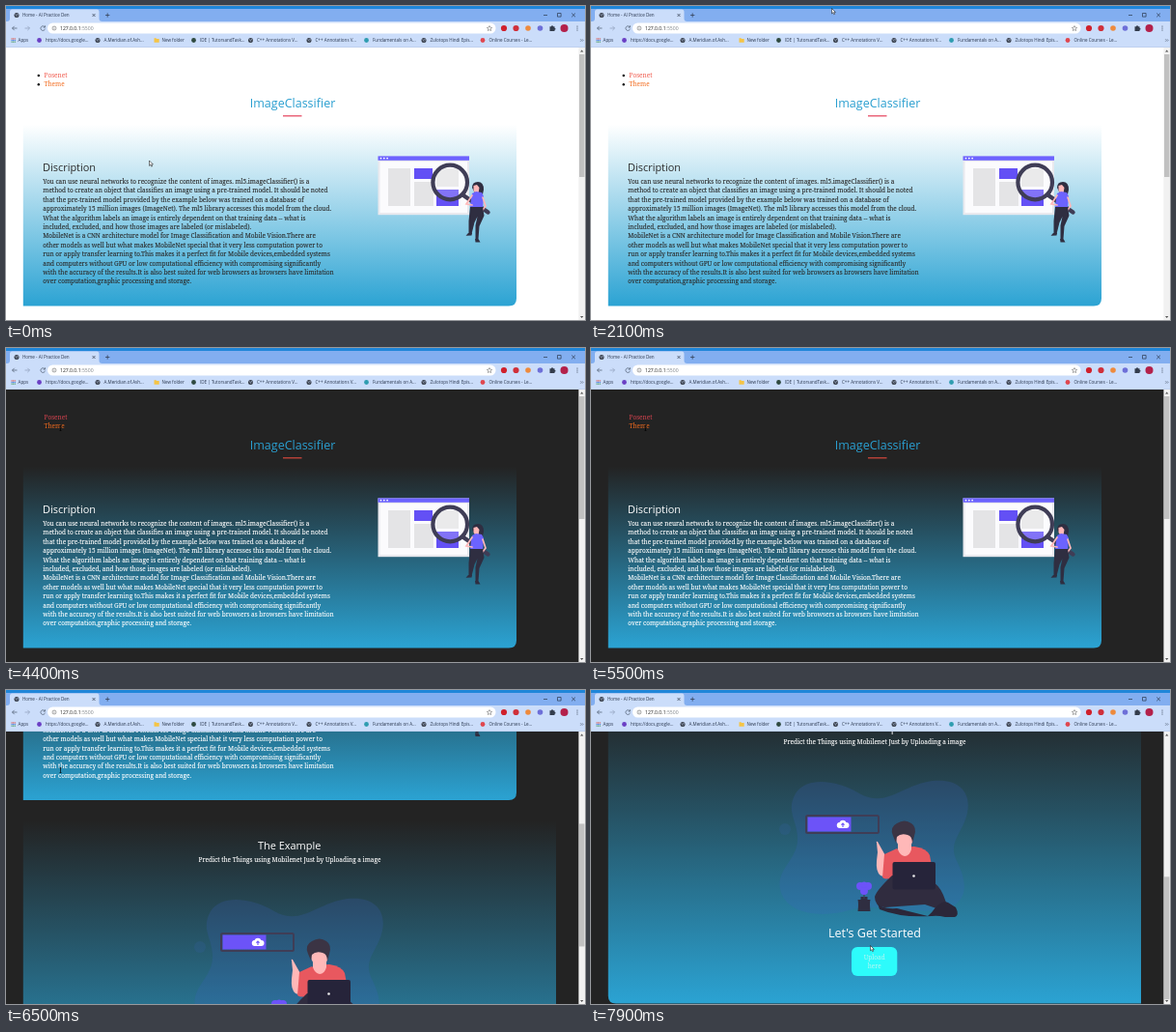
An HTML page that plays this animation: 600 by 325 pixels, repeating every 8000 ms.

```html
<!DOCTYPE html>
<html lang="en">
<head>
<meta charset="utf-8">
<title>Image classifier page</title>
<style>
  html, body { margin: 0; width: 100%; height: 100%; overflow: hidden; }
  svg { display: block; width: 100vw; height: 100vh;
    --bg: #fff; --ink: #2b2b2b; --rule: #e5405a; --link: #f0594c; }
  svg.dark { --bg: #232323; --ink: #fff; --rule: #d8483c; --link: #d4434f; }
  svg.dark .bullet { display: none; }
  .bg { fill: var(--bg); }
  .stop { stop-color: var(--bg); }
  .ink { fill: var(--ink); }
  .serif { font: 6.47px "Noto Serif", serif; }
  .serif.ink { stroke: var(--ink); stroke-width: .1; }
  .head { font: 10.94px "Open Sans", sans-serif; }
  .big { font: 12.5px "Open Sans", sans-serif; }
  .ui { font: 4.55px "Open Sans", sans-serif; fill: #29364d; }
  .mid { text-anchor: middle; }
</style>
</head>
<body>
<svg id="stage" viewBox="0 0 600 325" preserveAspectRatio="none" xmlns="http://www.w3.org/2000/svg">
  <defs>
    <linearGradient id="fade" x1="0" y1="0" x2="0" y2="1">
      <stop class="stop" offset="0"/><stop offset="1" stop-color="#2ba3d3"/>
    </linearGradient>
  </defs>
  <rect class="bg" width="600" height="325"/>

  <g id="page">
    <g class="bullet"><circle cx="33.8" cy="72" r="1.2"/><circle cx="33.8" cy="81.3" r="1.2"/></g>
    <g class="serif">
      <text x="39.5" y="74" style="fill:var(--link)">Posenet</text>
      <text x="39.5" y="83.4" fill="#f26b1d">Theme</text>
    </g>
    <text class="big mid" x="297" y="104.5" fill="#2a9fd0">ImageClassifier</text>
    <rect x="287" y="113.2" width="19.5" height="1.2" style="fill:var(--rule)"/>

    <path d="M17.800 122.500H529V302.600Q529 310.600 521 310.600H17.800Z" fill="url(#fade)"/>
    <text class="head ink" x="38" y="171.4">Discription</text>
    <g id="about" class="serif ink"></g>

    <!-- search illustration -->
    <g id="search">
      <rect x="385.500" y="155.400" width="94.500" height="60.800" fill="#e9e9ee"/>
      <rect x="387.500" y="161" width="90.500" height="53" fill="#fbfbfd"/>
      <rect x="385.500" y="155.400" width="94.500" height="4.400" fill="#6c63ff"/>
      <g fill="#fff"><circle cx="388.5" cy="157.6" r=".9"/><circle cx="391.8" cy="157.6" r=".9"/><circle cx="395.1" cy="157.6" r=".9"/></g>
      <path fill="#e4e4e6" d="M396 168h23v39h-23zM423 182h20v25h-20zM446 168h23v19h-23z"/>
      <path fill="#6350f5" d="M423 168h19v11h-19zM446 190h23v17h-23z"/>
      <path d="M474 196L499.500 213.500" stroke="#3f3d56" stroke-width="4.400" stroke-linecap="round"/>
      <circle cx="460.2" cy="182.5" r="17.8" fill="#fff" fill-opacity=".2" stroke="#3f3d56" stroke-width="4.2"/>
      <path d="M483 188q0-6 6-6 6 0 6 8l-1 5-8-1z" fill="#2f2e41"/>
      <path d="M484.5 186l3.5-1 2.5 3-1 6h-3l-2-3z" fill="#ffb8b8"/>
      <path d="M483 194l4-2 6 1 2 4-1 12h-13l1-9z" fill="#6c63ff"/>
      <path d="M483 196l-6 9 6 1M494 198l3 9-3 4" fill="none" stroke="#ffb8b8" stroke-width="1.7" stroke-linecap="round"/>
      <path d="M481 208h13l1.5 9-5 11-1 13h-3l0-14 2-9-3 6-3 12-3-.5 0-13z" fill="#2f2e41"/>
      <path d="M479 235l4 0-.5 2.5-6 .3zM486 241h3.5l2 3.5h-5z" fill="#2f2e41"/>
    </g>

    <path d="M17.800 332H570V643H25.800Q17.800 643 17.800 635Z" fill="url(#fade)"/>
    <text class="head ink mid" x="293.7" y="361.4">The Example</text>
    <text class="serif ink mid" x="294" y="374.6">Predict the Things using Mobilenet Just by Uploading a image</text>

    <!-- upload illustration, drawn in its own space -->
    <g transform="translate(0 302.5)">
      <path d="M212 123c12-18 42-14 66 0 28 16 44-9 76-13 28-3 42 13 35 37-6 20-20 27-9 48 12 24 10 46-21 49-36 3-61-8-92 0-30 9-66 3-71-22-4-20 17-30 18-50 1-20-13-30-2-49z" fill="#3f62c0" opacity=".2"/>
      <circle cx="201" cy="160" r="6" fill="#3f62c0" opacity=".15"/>
      <rect x="223" y="146" width="75" height="18" rx="1.5" fill="none" stroke="#3f3d56" stroke-width="2"/>
      <rect x="224.5" y="147.5" width="45" height="15" fill="#6c53f8"/>
      <path d="M258 159a3 3 0 0 1-.5-6 3.8 3.8 0 0 1 7 0 3 3 0 0 1 0 6z" fill="#fff"/>
      <path d="M261 158v-4m-1.6 1.6l1.6-1.6 1.6 1.6" fill="none" stroke="#6c53f8" stroke-width="1.1"/>
      <path d="M276.5 233h3v-3h7v3h3q-1 3 0 12h-13q1-8 0-12z" fill="#2f2e41"/>
      <path d="M283 232v-10" stroke="#3f3d56" stroke-width="1.2"/>
      <g fill="#6c53f8"><circle cx="279" cy="219" r="4"/><circle cx="287" cy="219" r="4"/><circle cx="283" cy="224" r="4"/><circle cx="283" cy="217.5" r="3"/></g>
      <path d="M306 203q6-21 14-24l15-1q13 2 16 9l4 21-12 8h-34z" fill="#e8585f"/>
      <path d="M296 174q-1-2 1-1l5 9 4 7-1 17q-1 4-5 2-5-4-4-15l1-9z" fill="#ffb8b8"/>
      <path d="M304 186l13-6-4 28q-6 6-11 2z" fill="#e8585f"/>
      <path d="M318 172h14v9q-2 7-7 7-5-1-7-7z" fill="#ffb8b8"/>
      <ellipse cx="325" cy="169" rx="9" ry="11" fill="#ffb8b8"/>
      <path d="M313 167q-4-9 4-13 8-5 15 0 6 4 3 13l-2 8q0-8-5-9-7-2-11 2l-1 6z" fill="#3b3444"/>
      <path d="M312 208q-16 15-18 22 0 10 10 11l42-3 18 6 4-8-3-8q-4-10-14-16z" fill="#302c3f"/>
      <path d="M297 237q4 6 20 5l32 8q4-3 8-9 8-8 13-5l8 5q4 8-1 10l-10 0q-8-2-14-1-32 2-54-7z" fill="#2b2739"/>
      <rect x="312.5" y="194" width="44.5" height="28.5" rx="2" fill="#26243a"/>
      <circle cx="334.5" cy="208.5" r="1.3" fill="#eee"/>
    </g>

    <text class="big ink mid" x="294" y="574">Let's Get Started</text>
    <rect x="270" y="584.5" width="47.3" height="30" rx="6" fill="#2dfbfb"/>
    <g class="serif mid" fill="#b9f6f2">
      <text x="293.7" y="597.2">Upload</text><text x="293.7" y="606.600">here</text>
    </g>
  </g>

  <!-- scrollbar -->
  <rect x="593.4" y="43" width="6.6" height="282" fill="#f1f1f1"/>
  <rect id="thumb" x="594" width="5.4" height="127" fill="#c1c1c1"/>
  <path d="M595 47.5l1.7-2 1.7 2zM595 321l1.7 2 1.7-2z" fill="#555"/>

  <!-- browser frame -->
  <rect width="600" height="43" fill="#cbddfa"/>
  <rect width="600" height="16" fill="#82aef0"/>
  <rect width="600" height="3" fill="#1f86d9"/>
  <path d="M1 16q3 0 3-3V6q0-2.500 2.500-2.500H94q2.500 0 2.500 2.500v7q0 3 3 3z" fill="#cbddfa"/>
  <rect y="42.500" width="600" height=".5" fill="#b3c5e2"/>
  <rect x="43" y="17.500" width="464.500" height="11" rx="5.500" fill="#fff"/>
  <g id="chrome"></g>
  <path id="arrow" d="M0 0V5.400L1.300 4.300 2.200 6.200 3.100 5.800 2.200 3.900H3.900Z" fill="#fff" stroke="#111" stroke-width=".55"/>
  <path id="beam" d="M-1 0H1M0 0V5M-1 5H1" fill="none" stroke="#000" stroke-width=".7"/>
</svg>

<script>
const $ = id => document.getElementById(id);
const text = (x, y, s) => `<text x="${x}" y="${y}">${s}</text>`;
const dot = (x, y, r, fill) => `<circle cx="${x}" cy="${y}" r="${r}" fill="${fill}"/>`;
const line = (d, color = '#2f3a4c', w = .7) =>
  `<path d="${d}" fill="none" stroke="${color}" stroke-width="${w}"/>`;
const globe = (x, y) => dot(x, y, 2.5, '#353b47') +
  line(`M${x - 1.7} ${y - .8}l1.500 .6 .4 1.500M${x + .6} ${y - 1.6}l.3 1 1 .3`, '#cbddfa', .6);

$('about').innerHTML = [
  'You can use neural networks to recognize the content of images. ml5.imageClassifier() is a',
  'method to create an object that classifies an image using a pre-trained model. It should be noted',
  'that the pre-trained model provided by the example below was trained on a database of',
  'approximately 15 million images (ImageNet). The ml5 library accesses this model from the cloud.',
  'What the algorithm labels an image is entirely dependent on that training data -- what is',
  'included, excluded, and how those images are labeled (or mislabeled).',
  'MobileNet is a CNN architecture model for Image Classification and Mobile Vision.There are',
  'other models as well but what makes MobileNet special that it very less computation power to',
  'run or apply transfer learning to.This makes it a perfect fit for Mobile devices,embedded systems',
  'and computers without GPU or low computational efficiency with compromising significantly',
  'with the accuracy of the results.It is also best suited for web browsers as browsers have limitation',
  'over computation,graphic processing and storage.'
].map((s, i) => text(38.3, 184 + i * 9.4, s)).join('');

function bookmarks() {
  const items = [
    [41, 'https://docs.google...', '#6a3fc4'], [101.5, 'A.Meridian.of.Ash...'],
    [161.5, 'New folder', 'folder'], [201, 'IDE | TutorsandTask...', '#2f4a40'],
    [260, 'C++ Annotations V...'], [320.5, 'C++ Annotations V...'],
    [380, 'Fundamentals on A...', '#2f9db0'], [439.5, 'Zulotops Hindi Epis...'],
    [500.5, 'Online Courses - Le...', '#e0474f']
  ];
  const colors = ['#d9493f', '#4a7de0', '#3f9a58'];
  let grid = '';
  for (let i = 0; i < 9; i++)
    grid += `<rect x="${5.5 + i % 3 * 1.6}" y="${33.4 + (i / 3 | 0) * 1.6}" width="1.1" height="1.1" fill="${colors[i / 3 | 0]}"/>`;
  return grid + text(12.5, 37.2, 'Apps') + items.map(([x, label, kind]) => {
    const icon = !kind ? globe(x - 6.5, 35.5)
      : kind === 'folder' ? `<path d="M${x - 8} 33.3h2l.6.8h2.600v3.700h-5.200z" fill="#f5c445"/>`
      : dot(x - 6.5, 35.5, 2.4, kind);
    return icon + text(x, 37.2, label);
  }).join('') + line('M595.200 34.300l1.100 1.200-1.100 1.200M597 34.300l1.100 1.200-1.100 1.200', '#2f3a4c', .5);
}

$('chrome').innerHTML = `<g class="ui">
  ${globe(11, 9.5)}${text(17, 11.2, 'Home - AI Practice Den')}
  ${line('M89.500 8l3 3m0-3l-3 3M103 9.500h4.400m-2.200-2.200v4.400')}
  ${line('M557 9.500h4M571.500 7.500h3.600v3.600h-3.600zM586.200 7.500l3.800 3.800m0-3.800l-3.800 3.800', '#1c2430', .6)}
  ${line('M11.500 23h-5m2.200-2.200L6.500 23l2.200 2.200', '#4a566b')}
  ${line('M19.500 23h5m-2.200-2.200l2.200 2.200-2.200 2.200', '#8d9db8')}
  ${line('M40 21.600a2.300 2.300 0 1 0 .5 2M40.500 20.300v1.800h-1.800', '#4a566b')}
  ${line('M48 23a2 2 0 1 0 4 0a2 2 0 1 0-4 0M50 22.700v1.400M50 21.600v.5', '#555', .5)}
  <text x="56" y="24.900" style="font-size:5.1px;fill:#222">127.0.0.1<tspan fill="#80868b">:5500</tspan></text>
  ${line('M501 20.500l.8 1.700 1.800.2-1.300 1.300.3 1.800-1.600-.9-1.600.9.3-1.800-1.300-1.300 1.800-.2z', '#555', .5)}
  ${dot(516, 23, 3.1, '#d0202c')}${dot(528.5, 23, 3.1, '#d0303a')}${dot(541, 23, 2.8, '#ee8a3c')}${dot(553.5, 23, 2.8, '#6d6fd8')}
  <path d="M563.500 21.300h1.500a1 1 0 0 1 2 0h1.500v1.500a1 1 0 0 1 0 2v1.200h-5z" fill="#333c4c"/>
  ${dot(578.5, 23, 4, '#b3204a')}
  ${[21, 23, 25].map(y => dot(592, y, .6, '#3a4559')).join('')}
  ${bookmarks()}</g>`;

const LOOP = 8000, DARK_AT = 4000, BEAM_FROM = 3600, BEAM_TO = 6800;
const smooth = p => p * p * (3 - 2 * p);
const linear = p => p;

// keys: [time, ...values]
function track(keys, t, ease) {
  let i = 0;
  while (i < keys.length - 1 && t >= keys[i + 1][0]) i++;
  const a = keys[i], b = keys[i + 1] || a;
  const p = b === a ? 0 : ease(Math.max(0, (t - a[0]) / (b[0] - a[0])));
  return a.slice(1).map((v, k) => v + (b[k + 1] - v) * p);
}

const scrollKeys = [[0, 0], [6050, 0], [6200, 36.2], [6700, 302.5], [6800, 318.5]];
const cursorKeys = [[0, 148.5, 160], [900, 148.5, 160], [2000, 249.5, 2.5],
  [2500, 249.5, 2.5], [3700, 56.5, 80.5], [6800, 56.5, 80.5], [7500, 289.5, 264.5]];

function draw(t) {
  const [scroll] = track(scrollKeys, t, linear);
  const [x, y] = track(cursorKeys, t, smooth);
  const beam = t >= BEAM_FROM && t < BEAM_TO;
  $('stage').classList.toggle('dark', t >= DARK_AT);
  $('page').setAttribute('transform', `translate(0 ${-scroll})`);
  $('thumb').setAttribute('y', 50 + scroll * .45);
  for (const id of ['arrow', 'beam']) {
    $(id).setAttribute('transform', `translate(${x} ${y})`);
    $(id).setAttribute('visibility', (id === 'beam') === beam ? 'visible' : 'hidden');
  }
}

const start = performance.now();
function tick() {
  draw((performance.now() - start) % LOOP);
  requestAnimationFrame(tick);
}
tick();
</script>
</body>
</html>
```
